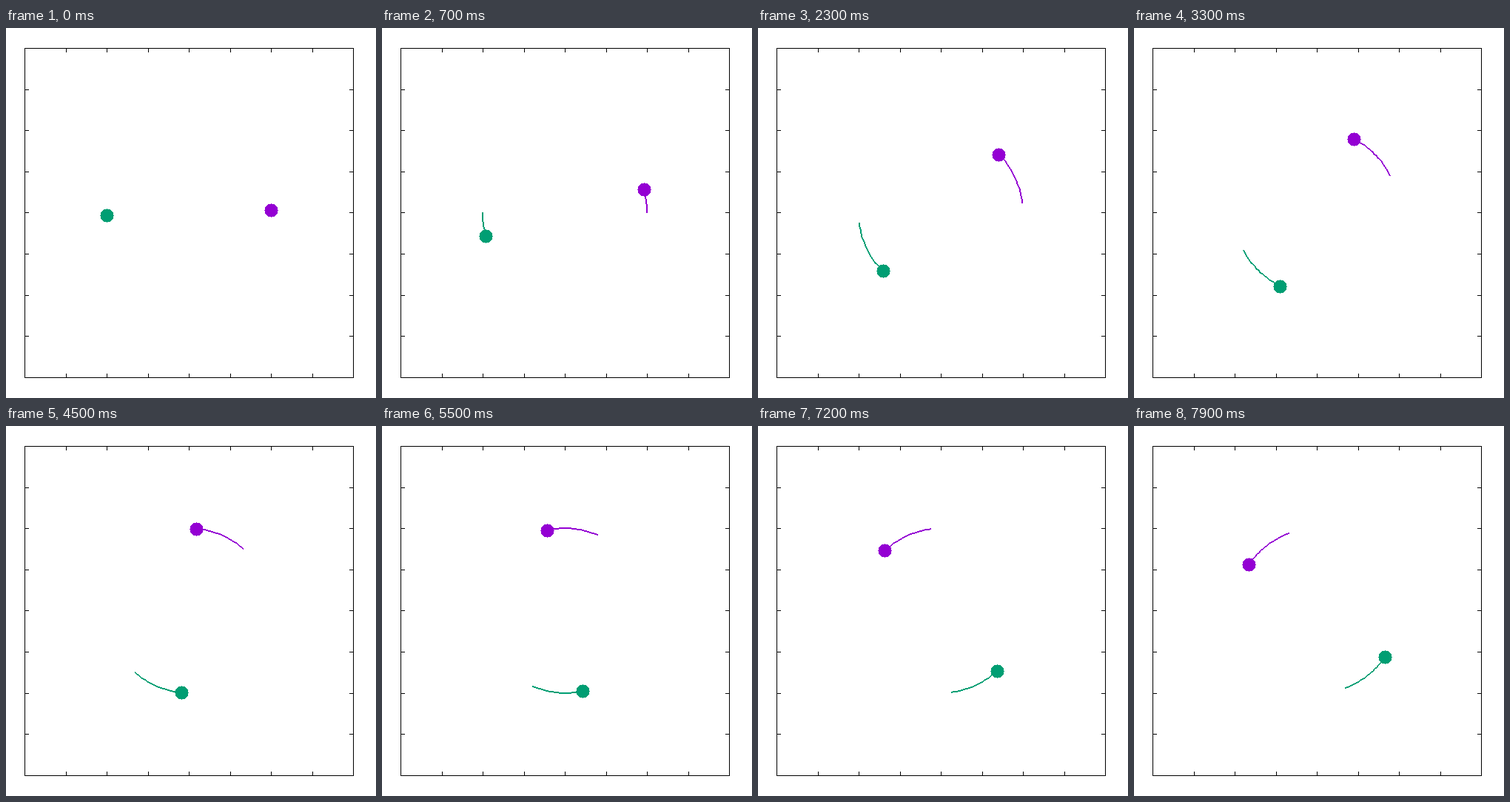
Animation of 500 by 500 pixels, one loop 8 s. Source, as an HTML page with a canvas:

```html
<!DOCTYPE html>
<html lang="en">
<head>
<meta charset="utf-8">
<title>Two orbiting bodies</title>
<style>
  html, body { margin: 0; width: 100%; height: 100%; overflow: hidden; background: #fff; }
  canvas { display: block; width: 500px; height: 500px; }
</style>
</head>
<body>
<canvas id="stage" width="500" height="500"></canvas>
<script>
const ctx = document.getElementById("stage").getContext("2d");
const LEFT = 25, RIGHT = 469, TOP = 27, BOTTOM = 472;
const STEP_MS = 100, STEPS = 80, TRAIL = 20, RADIUS = 9;
const JUMP = 7; // the orbit skips one sample here
const bodies = [
  { color: "#9400d3", sign: 1 },
  { color: "#009e73", sign: -1 }
];

// Plot coordinates run from -2 to 2 on both axes.
const toX = u => LEFT + Math.round((u + 2) / 4 * (RIGHT - LEFT));
const toY = v => BOTTOM - Math.round((v + 2) / 4 * (BOTTOM - TOP));

const sample = step => step < 0 ? 0 : step + (step < JUMP ? 1 : 2);

function position(step, sign) {
  const angle = sample(step) * Math.PI / 100;
  return [toX(sign * Math.cos(angle)), toY(sign * Math.sin(angle))];
}

function drawFrame() {
  ctx.fillStyle = "#000";
  ctx.fillRect(LEFT, TOP, RIGHT - LEFT + 1, 1);
  ctx.fillRect(LEFT, BOTTOM, RIGHT - LEFT + 1, 1);
  ctx.fillRect(LEFT, TOP, 1, BOTTOM - TOP + 1);
  ctx.fillRect(RIGHT, TOP, 1, BOTTOM - TOP + 1);
  for (let u = -1.5; u < 2; u += 0.5) {
    const x = toX(u), y = toY(u);
    ctx.fillRect(x, TOP, 1, 6);
    ctx.fillRect(x, BOTTOM - 5, 1, 6);
    ctx.fillRect(LEFT, y, 6, 1);
    ctx.fillRect(RIGHT - 5, y, 6, 1);
  }
}

// Crisp line, two pixels thick across its main direction.
function drawLine([x0, y0], [x1, y1]) {
  const dx = x1 - x0, dy = y1 - y0;
  const steep = Math.abs(dy) > Math.abs(dx);
  const n = Math.max(Math.abs(dx), Math.abs(dy));
  for (let i = 0; i <= n; i++) {
    const x = Math.round(x0 + dx * i / (n || 1));
    const y = Math.round(y0 + dy * i / (n || 1));
    if (steep) ctx.fillRect(x - 1, y, 2, 1);
    else ctx.fillRect(x, y - 1, 1, 2);
  }
}

function drawDisc([x, y]) {
  for (let dy = -RADIUS; dy <= RADIUS; dy++) {
    const half = Math.floor(Math.sqrt(RADIUS * RADIUS - dy * dy));
    ctx.fillRect(x - half, y + dy, 2 * half + 1, 1);
  }
}

function draw(step) {
  ctx.fillStyle = "#fff";
  ctx.fillRect(0, 0, 500, 500);
  drawFrame();
  for (const { color, sign } of bodies) {
    ctx.fillStyle = color;
    for (let s = Math.max(-1, step - TRAIL); s < step; s++) {
      drawLine(position(s, sign), position(s + 1, sign));
    }
    drawDisc(position(step, sign));
  }
}

const start = performance.now();
function tick() {
  const elapsed = performance.now() - start;
  draw(Math.floor(elapsed / STEP_MS) % STEPS);
  requestAnimationFrame(tick);
}
tick();
</script>
</body>
</html>
```
